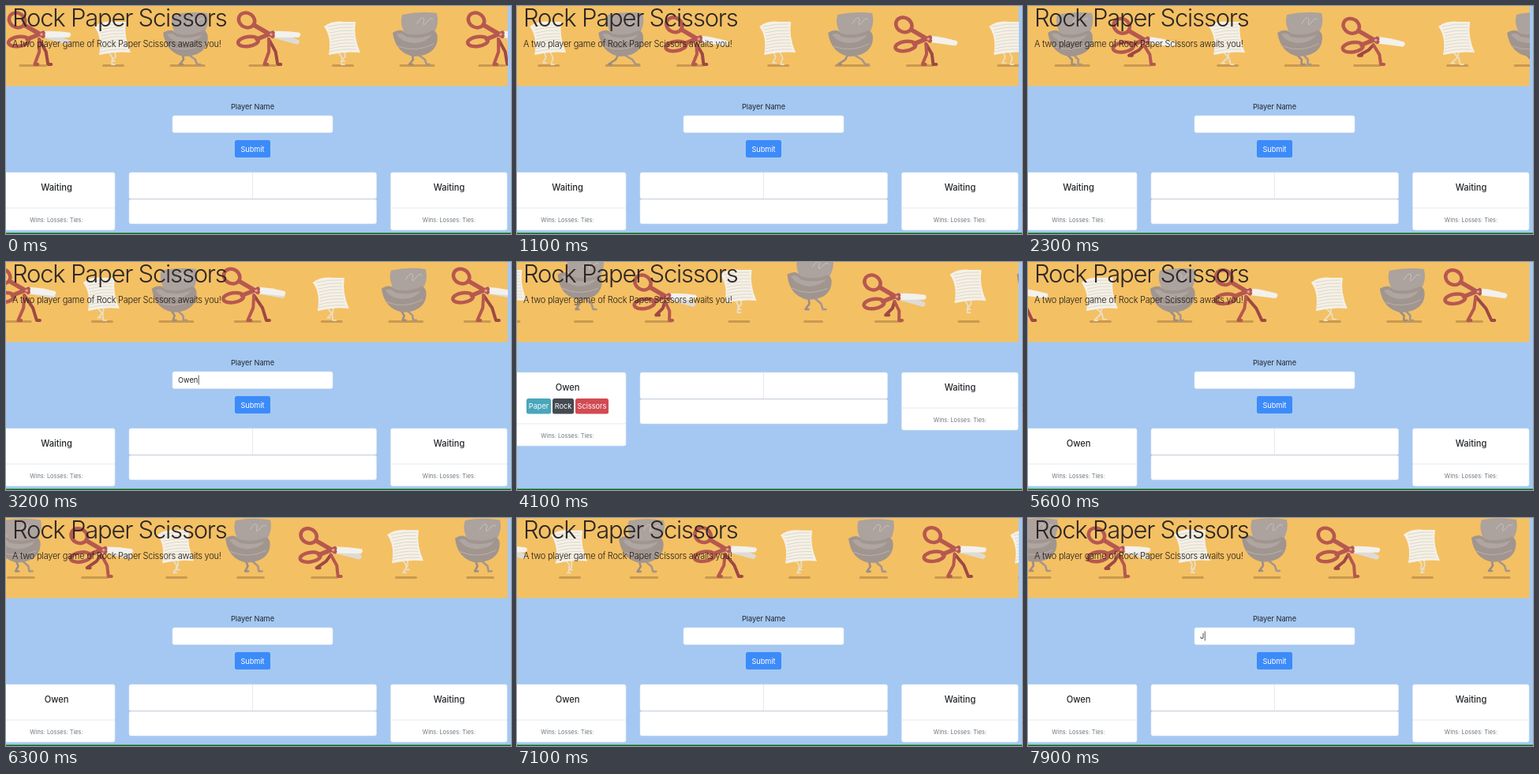
An HTML page with a canvas for the animation above (8 s loop, 640 by 289 pixels).

```html
<!DOCTYPE html>
<html lang="en">
<head>
<meta charset="utf-8">
<title>Rock Paper Scissors</title>
<style>
  html, body { margin: 0; width: 100%; height: 100%; overflow: hidden; background: #a4c8f2; }
  canvas, svg { position: absolute; left: 0; top: 0; }
  text { font-family: Inter, Roboto, sans-serif; font-size: 9.2px; fill: #212529; }
  .mid { text-anchor: middle; }
  .title { font-size: 31px; font-weight: 300; letter-spacing: -1.22px; fill: #2c2725; }
  .lead { font-size: 11px; font-weight: 300; letter-spacing: -.24px; fill: #1e1a18; }
  .name { font-size: 11.1px; font-weight: 500; }
  .stats { font-size: 7.4px; fill: #6c757d; }
  .white { fill: #fff; }
  .box { fill: #fff; stroke: #e2e9f2; stroke-width: .6; }
  .rule { stroke: #dfe2e5; stroke-width: .8; }
  .tip { font-size: 7px; font-weight: 600; fill: #fff; }
  #tip rect { fill: #818486; filter: drop-shadow(0 2px 4px #0005); }
</style>
</head>
<body>
<canvas id="banner" width="636" height="102"></canvas>
<svg width="640" height="289" viewBox="0 0 640 289">
  <text class="title" x="8" y="26.3">Rock Paper Scissors</text>
  <text class="lead" x="8" y="51.5">A two player game of Rock Paper Scissors awaits you!</text>
  <g id="form">
    <text class="mid" x="312.5" y="130.5">Player Name</text>
    <rect class="box" x="211" y="139" width="203" height="21.5" rx="2.5"/>
    <text id="typed" x="218" y="153"></text>
    <path id="caret" d="M0 143.5v12" stroke="#333" stroke-width=".8"/>
    <rect x="290" y="170" width="45" height="22" rx="2.5" fill="#3c8bfa"/>
    <text class="mid white" x="312.5" y="184.5">Submit</text>
  </g>
  <g id="cards">
    <rect id="leftBox" class="box" x="-4" y="211" width="142" height="73" rx="2.5"/>
    <text id="leftName" class="mid name" x="64" y="234"></text>
    <g id="moves"></g>
    <g id="leftFoot">
      <path class="rule" d="M0 256h138"/>
      <text class="mid stats" x="64" y="273.5">Wins: Losses: Ties:</text>
    </g>
    <rect class="box" x="156" y="211" width="313.5" height="33.5" rx="2.5"/>
    <rect class="box" x="156" y="245" width="313.5" height="31" rx="2.5"/>
    <path class="rule" d="M312.5 211v33"/>
    <path class="rule" d="M156 244.7h313.5" style="stroke:#c3c9d0"/>
    <rect class="box" x="487.5" y="211" width="147.5" height="73" rx="2.5"/>
    <path class="rule" d="M488 256h147"/>
    <text class="mid name" x="561.5" y="234">Waiting</text>
    <text class="mid stats" x="561.5" y="273.5">Wins: Losses: Ties:</text>
  </g>
  <g id="tip">
    <rect x="210" y="162" width="49" height="15.5" rx="2.5"/>
    <text class="mid tip" x="235.5" y="172.5">Owen Sebry</text>
  </g>
  <rect y="287.5" width="640" height="1.5" fill="#0a6a14"/>
</svg>
<script>
const LOOP = 8000, STEP = 100, WALK = 1640, TILE = 291;
const SUBMIT = 3600, SWITCH = 5500, PLAYER = 'Owen';
const $ = id => document.getElementById(id);
const c = $('banner').getContext('2d');
const { PI, cos, sin, max } = Math;

$('moves').innerHTML = [['Paper', 12, 31, '#48a6bb'], ['Rock', 45, 27, '#444a51'], ['Scissors', 74, 42, '#d14b52']]
  .map(([label, x, w, fill]) => `<rect x="${x}" y="244" width="${w}" height="19.5" rx="2.5" fill="${fill}"/>
    <text class="mid white" x="${x + w / 2}" y="257">${label}</text>`).join('');

function stroke(color, width, d) {
  c.strokeStyle = color;
  c.lineWidth = width;
  c.stroke(new Path2D(d));
}

function fill(color, d) {
  c.fillStyle = color;
  c.fill(new Path2D(d));
}

function at(x, y, angle, paint) {
  c.save();
  c.translate(x, y);
  c.rotate(angle);
  paint();
  c.restore();
}

function ring(x, y, rx, ry, angle) {
  c.beginPath();
  c.ellipse(x, y, rx, ry, angle, 0, 2 * PI);
  c.strokeStyle = '#b6584f';
  c.lineWidth = 4.5;
  c.stroke();
}

function shadow(x, w) {
  stroke('#c9994f', 3, `M${x - w / 2} 75.5h${w}`);
}

function leg(color, width, x, y, foot, lift) {
  const ground = 74 - lift;
  stroke(color, width, `M${x} ${y}L${(x + foot) / 2 + 3} ${(y + ground) / 2}L${foot} ${ground}h4`);
}

function scissors(x, p) {
  const y = 4 - 4 * cos(2 * PI * p), gap = max(0, cos(8 * PI * p)) * .14;
  const swing = 2 * PI * p - .6, reach = 20 * sin(swing);
  shadow(x + 34, 32);
  leg('#9f4844', 4, x + 42, y + 42, x + 42 - reach, max(0, 12 * sin(swing)));
  leg('#b6584f', 4, x + 42, y + 42, x + 42 + reach * .5, 0);
  at(x + 47, y + 36, .13, () => {
    for (const side of [1, -1])
      at(0, 0, side * gap, () => fill(side > 0 ? '#dedbd6' : '#f3f1ec', 'M-4 -4Q16 -5 34 -2Q37 1 33 4L-4 4Z'));
  });
  stroke('#b6584f', 5.5, `M${x + 23} ${y + 24}L${x + 47} ${y + 38}M${x + 27} ${y + 42}L${x + 47} ${y + 34}`);
  ring(x + 14, y + 18, 10.5, 9, .5);
  ring(x + 16, y + 45, 13, 6, -.15);
  c.beginPath();
  c.arc(x + 45, y + 36, 1.8, 0, 2 * PI);
  c.fillStyle = '#dfa08d';
  c.fill();
}

function paper(x, p, jump) {
  const swing = 4 * PI * p, reach = 6 * sin(swing);
  shadow(x + 2, 25);
  for (const side of [-1, 1])
    leg('#eadfc4', 1.8, x + side * 4, 58 - 12 * jump, x + side * reach, 10 * jump + max(0, 4 * side * cos(swing)));
  at(x, 21 - 10 * jump, 0, () => {
    fill('#f5f1e7', 'M-22 5Q-11 -3 3 -1L18 -1Q15 18 24 38Q4 36 -16 41Q-12 18 -22 5Z');
    for (let i = 0; i < 9; i++) {
      const y = 4 + i * 4, left = -17 + 4 * sin(i / 3);
      stroke('#d8d1c3', .8, `M${left} ${y + 1}Q0 ${y - 3} ${15 + i * i / 16} ${y - 2}`);
    }
  });
}

function chair(x, p, jump) {
  const reach = 10 * sin(4 * PI * p), hip = 62 - 16 * jump;
  shadow(x + 2, 42 - 20 * jump);
  leg('#9b8d86', 2.6, x - 4, hip, x - 8 - reach, 14 * jump);
  leg('#a4968e', 2.6, x + 4, hip, x + 14 + reach * .5, 14 * jump);
  at(x, 8 - 16 * jump, .08 * jump, () => {
    fill('#aca29e', 'M-17 3Q5 -2 27 1Q31 15 22 29L-12 29Q-21 15 -17 3Z');
    fill('#a1958f', 'M-29 26Q-18 19 -12 27Q6 31 22 23Q30 25 27 39Q22 55 -2 56Q-25 52 -29 26Z');
    fill('#b0a6a1', 'M-24 28Q-17 25 -12 31Q5 35 21 28Q15 38 -2 39Q-18 38 -24 28Z');
    stroke('#bdb4ae', .9, 'M-22 43Q0 52 23 40');
    stroke('#cdc6c1', .9, 'M2 14Q8 3 11 9Q8 20 14 13Q19 5 22 9');
  });
}

function drawBanner(p) {
  const stride = cos(8 * PI * p), jump = max(0, stride) * (1 - cos(2 * PI * p)) / 2;
  c.clearRect(0, 0, 636, 102);
  c.fillStyle = '#f4c064';
  c.fillRect(0, 0, 635.6, 101.5);
  c.lineCap = c.lineJoin = 'round';
  for (let x = TILE * (p - 3); x < 700; x += TILE) {
    chair(x + 228, p, jump);
    paper(x + 134, p, jump);
    scissors(x - 7 * (1 - stride), p);
  }
}

function show(id, on) {
  $(id).style.display = on ? '' : 'none';
}

function typedAt(t) {
  if (t < SWITCH) return PLAYER.slice(0, max(0, Math.floor((t - 2600) / 150)));
  return t >= 7700 ? 'J' : '';
}

function draw(now) {
  const t = Math.floor(now % LOOP / STEP) * STEP;
  const joined = t >= SUBMIT && t < SWITCH;
  const phase = t < SWITCH ? t / WALK : (t - 6300) / WALK + 1.275;
  drawBanner(phase % 1);

  const typed = typedAt(t);
  $('typed').textContent = typed;
  show('form', !joined);
  show('caret', typed);
  if (typed && !joined) $('caret').setAttribute('transform', `translate(${219 + $('typed').getComputedTextLength()})`);

  $('cards').setAttribute('transform', `translate(0 ${joined ? -71 : 0})`);
  $('leftBox').setAttribute('height', joined ? 93 : 73);
  $('leftFoot').setAttribute('transform', `translate(0 ${joined ? 20 : 0})`);
  $('leftName').textContent = t < SUBMIT ? 'Waiting' : PLAYER;
  show('moves', joined);
  show('tip', t >= 4800 && t < 5400);
  requestAnimationFrame(draw);
}
requestAnimationFrame(draw);
</script>
</body>
</html>
```
